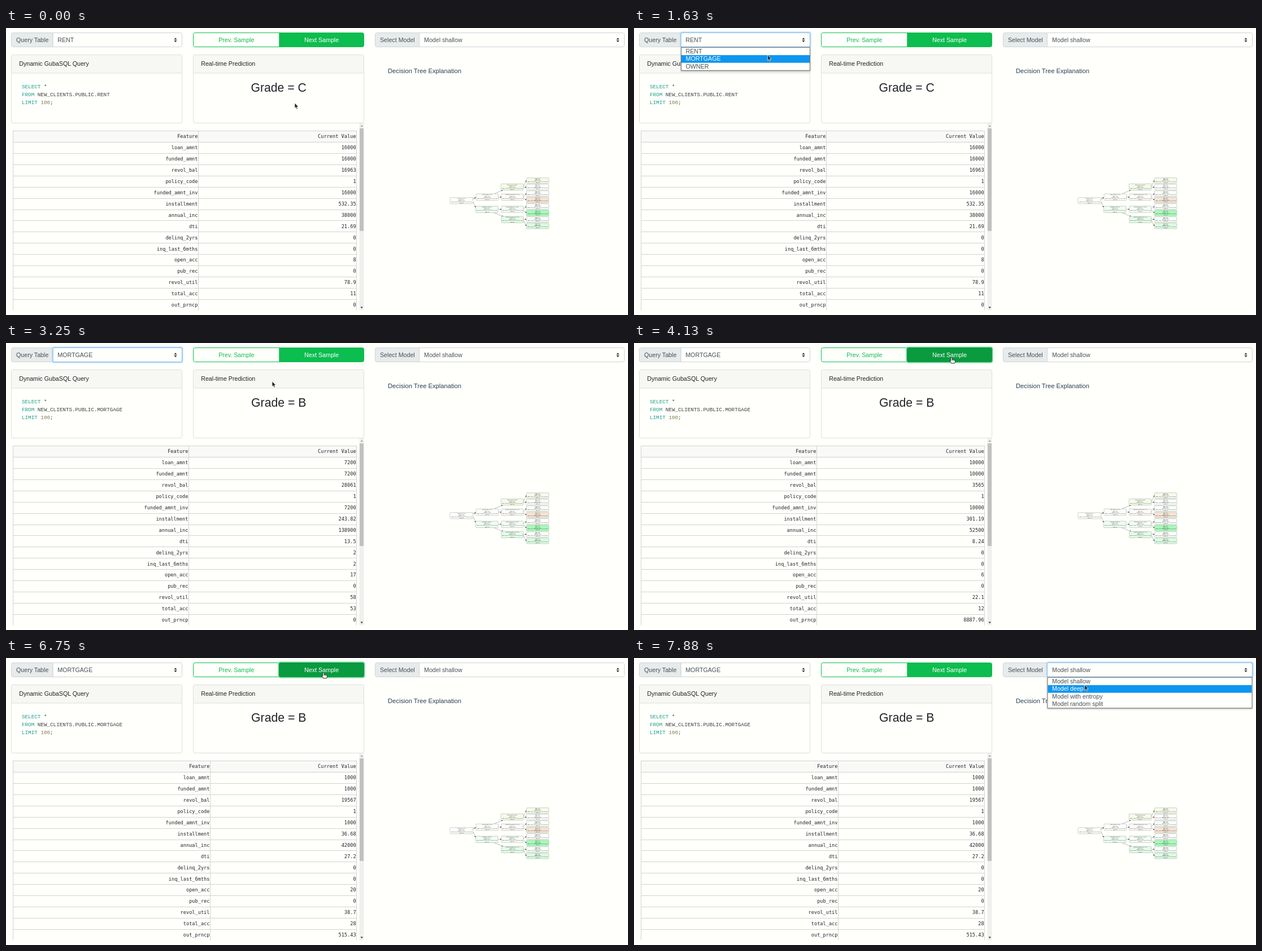
An HTML page that plays this animation: 1101x509 px, repeating every 8000 ms.

```html
<!DOCTYPE html>
<html lang="en">
<head>
<meta charset="utf-8">
<title>Loan grade dashboard</title>
<style>
html, body { margin: 0; width: 100%; height: 100%; overflow: hidden; background: #fffffc; }
svg { display: block; width: 1101px; height: 509px; font: 10.68px "Liberation Sans", Arial, sans-serif; }
text { white-space: pre; }
.code { font: 9.28px "Liberation Mono", monospace; }
.cell { font: 8.64px "DejaVu Sans Mono", monospace; text-anchor: end; }
.tiny { font-size: 1.75px; text-anchor: middle; }
.mid { text-anchor: middle; }
.menu { filter: drop-shadow(0 1px 1.5px rgba(0, 0, 0, .3)); }
</style>
</head>
<body>
<svg viewBox="0 0 1101 509"><g id="page"></g><g id="live"></g></svg>
<script>
const LOOP = 8000, STEP = 125;
const INK = '#212529', GREY = '#495057', GREEN = '#0cbd4f', DARK = '#0a9a40', PAPER = '#fffffc';
const $ = id => document.getElementById(id);

const rect = (x0, y0, x1, y1, fill, stroke = 'none', r = 0, more = '') =>
  `<rect x="${x0}" y="${y0}" width="${x1 - x0}" height="${y1 - y0}" rx="${r}" fill="${fill}" stroke="${stroke}" ${more}/>`;
const text = (x, y, s, fill = INK, more = '') => `<text x="${x}" y="${y}" fill="${fill}" ${more}>${s}</text>`;
const path = (d, fill, stroke = 'none', w = 1, more = '') =>
  `<path d="${d}" fill="${fill}" stroke="${stroke}" stroke-width="${w}" ${more}/>`;
const left = (x, y, r, b, k) => `M${r} ${y}H${x + k}Q${x} ${y} ${x} ${y + k}V${b - k}Q${x} ${b} ${x + k} ${b}H${r}Z`;
const right = (x, y, r, b, k) => `M${x} ${y}H${r - k}Q${r} ${y} ${r} ${y + k}V${b - k}Q${r} ${b} ${r - k} ${b}H${x}Z`;

// Table contents: one line per shown sample
const features = ('loan_amnt funded_amnt revol_bal policy_code funded_amnt_inv installment annual_inc dti ' +
  'delinq_2yrs inq_last_6mths open_acc pub_rec revol_util total_acc out_prncp').split(' ');
const samples = [
  [0, 340.5, '16000 16000 16963 1 16000 532.35 38000 21.69 0 0 8 0 78.9 11 0'],
  [2250, 323.5, '7200 7200 28061 1 7200 243.82 138900 13.5 2 2 17 0 58 53 0'],
  [4000, 323.5, '10000 10000 3565 1 10000 301.19 52500 8.24 0 0 6 0 22.1 12 8887.96'],
  [5250, 323.5, '8000 8000 27811 1 8000 263.58 93000 22.83 0 0 18 0 68.8 35 2975.36'],
  [6750, 361.5, '1000 1000 19567 1 1000 36.68 42000 27.2 0 0 20 0 38.7 28 515.43']
];

function select(x, split, end, label) {
  const arrow = end - 11.5;
  return path(left(x, 8.5, split, 33.5, 3), '#e7ebec', '#ced4d6') +
    path(right(split, 8.5, end, 33.5, 3), PAPER, '#ced4d6') +
    text(x + 8.5, 24.9, label, GREY) +
    path(`M${arrow - 2.6} 20.4h5.2l-2.6-3.2zM${arrow - 2.6} 22h5.2l-2.6 3.2z`, '#343a40');
}

function card(x, title) {
  return rect(x, 47.5, x + 302, 168.5, PAPER, '#dededb', 2.5) +
    path(`M${x + .5} 80V50q0-2 2-2h297q2 0 2 2v30z`, '#f7f7f4') +
    path(`M${x} 80h302`, 'none', '#dededb') +
    text(x + 13.7, 67, title);
}

function node(x, y, h, fill, title, w = 39.5) {
  const lines = [title, 'gini = 0.79', 'samples = 2194', 'value = [0.06, 0.19, 0.21, 0.2, 0.14, 0.12, 0.08]', 'class = B'];
  const pitch = (h - 1.2) / 5;
  return rect(x, y, x + w, y + h, fill, '#96a298', 1.2, 'stroke-width=".5"') +
    lines.map((s, i) => text(x + w / 2, y + .2 + pitch * (i + 1), s, '#000', 'class="tiny"')).join('');
}

function tree() {
  const edges = [
    [826.5, 304, 831.5, 300.5], [826.5, 308, 831.5, 318], [864, 294, 879, 287.7], [871.5, 300, 877, 300],
    [871.5, 321.5, 877, 321.5], [864, 327.7, 880, 334.2],
    ...[282, 300, 321.5, 340].flatMap((y, i) => [0, 1].map(k =>
      [916, y + k * 2 - 1, 921, 270.5 + (2 * i + k) * 11.5]))
  ];
  const heads = ([a, b, c, d]) => {
    const turn = Math.atan2(d - b, c - a) * 180 / Math.PI;
    return path(`M${a} ${b}L${c} ${d}`, 'none', '#777', .5) +
      path('M.5 0l-2.6-1v2z', '#222', 'none', 1, `transform="translate(${c} ${d}) rotate(${turn})"`);
  };
  const leaves = ['#f6faea', '#fdfefb', '#fbfdf8', '#f5e4d5', '#fcfefb', '#a5fbb8', '#f8fef8', '#ddfbe3'];
  return edges.map(heads).join('') +
    text(829, 301.5, 'True', '#000', 'class="tiny"') + text(831.5, 317, 'False', '#000', 'class="tiny"') +
    node(786, 300.7, 11, '#fdfefc', 'total_acc &lt;= 20.5', 40.5) +
    node(832, 294.2, 11.5, '#fbfdf9', 'revol_util_max &lt;= 37.5') +
    node(831.5, 316, 11.5, '#effcf1', 'installment &lt;= 283.41') +
    node(876.2, 276.3, 11.2, '#f4fbe9', 'total_rec_int &lt;= 488.91') +
    node(876.8, 294.2, 11.5, '#fdfbf8', 'collection_recovery_fee &lt;= 1.15', 38.8) +
    node(876.8, 315.8, 11.5, '#f4fdf5', 'funded_amnt_inv &lt;= 9412.5', 38.8) +
    node(876.8, 334, 11.5, '#e4fbe8', 'collection_recovery_fee &lt;= 2.5', 38.8) +
    leaves.map((c, i) => node(921.3, 265.7 + i * 11.48, 9.9, c, 'gini = 0.71')).join('');
}

$('page').innerHTML =
  select(9.5, 83, 311.5, 'Query Table') + select(653.5, 731.5, 1094.5, 'Select Model') +
  path(left(331.5, 8.5, 484, 33.5, 3), PAPER, GREEN) +
  text(407.8, 24.9, 'Prev. Sample', GREEN, 'class="mid"') +
  card(9.5, 'Dynamic GubaSQL Query') + card(331.5, 'Real-time Prediction') +
  text(676, 80.2, 'Decision Tree Explanation', '#2a3f50', 'style="font-size:11.2px"') +
  rect(625.5, 169, 633.5, 500.5, '#f0f0ee') + rect(626, 178, 633, 360, '#c1c1bf') +
  path('M627.4 175h4.6l-2.3-2.8z', '#a0a0a0') + path('M627.4 494.6h4.6l-2.3 2.8z', '#444') +
  tree();

function table([, split, values]) {
  const rowY = i => 182.5 + i * 19.93;
  const line = '#d2d2d0';
  const row = (a, b, i) => {
    const y = rowY(i) + 12.7 - (i ? 0 : .3);
    return text(split - 1, y, a, INK, 'class="cell"') + text(619.6, y, b, INK, 'class="cell"');
  };
  const nums = values.split(' ');
  let out = rect(13, 182.5, 621, 202.4, '#f9f9f7') + row('Feature', 'Current Value', 0);
  features.forEach((f, i) => out += row(f, nums[i], i + 1));
  for (let i = 0; i < 16; i++) out += path(`M12.5 ${Math.floor(rowY(i)) + .5}H621`, 'none', line);
  return out + path(`M12.5 182V500.5M${split} 182V500.5M620.5 182V500.5`, 'none', line);
}

function query(name) {
  const code = (y, s) => text(28, y, s, '#3c4043', 'class="code"');
  const key = s => `<tspan fill="#1f9f8a">${s}</tspan>`;
  return code(107, key('SELECT') + ' *') +
    code(121, key('FROM') + ' NEW_CLIENTS.PUBLIC.' + name) +
    code(135, key('LIMIT') + ' <tspan fill="#857a50">100</tspan>;');
}

function menu(x, end, items, y) {
  const pitch = 13.6;
  const hot = Math.max(0, Math.floor((y - 34) / pitch));
  return '<g class="menu">' + rect(x + .5, 34.3, end - .5, 34.5 + items.length * pitch, PAPER, '#6c7072') + '</g>' +
    rect(x + 1, 34.5 + hot * pitch, end - 1, 34.5 + (hot + 1) * pitch, '#0d96f0') +
    items.map((s, i) => text(x + 8.5, 44.6 + i * pitch, s, i === hot ? '#fff' : GREY)).join('');
}

const ring = (x, end, glow, edge) =>
  rect(x - 1, 7.5, end + 1, 34.5, 'none', glow, 3, 'stroke-width="2.4"') + rect(x, 8.5, end, 33.5, 'none', edge, 2);

// Pointer route: time, x, y
const route = [
  [125, 511, 133], [875, 241, 19], [1250, 241, 19], [1625, 236.5, 48], [2000, 236.5, 51],
  [2750, 395, 82], [2875, 395, 82], [3250, 471, 68], [3625, 562, 25.5],
  [6750, 562, 25.5], [7500, 798, 25], [7750, 798, 25], [7875, 797.5, 47.8]
];
function pointerAt(t) {
  const i = route.findIndex(p => p[0] > t);
  if (i < 0) return route[route.length - 1].slice(1);
  if (!i) return route[0].slice(1);
  const [a, b] = [route[i - 1], route[i]];
  const k = (t - a[0]) / (b[0] - a[0]);
  return [1, 2].map(n => a[n] + (b[n] - a[n]) * k);
}
function pointer(x, y) {
  const hand = x > 331 && x < 634 && y < 34;
  const shape = hand
    ? path('M-1.3.7Q0-.8 1.2.7V4Q2.5 3.2 3.2 4.5 4.6 3.8 5.2 5.2 6.4 5 6.4 6.3V8.2Q6.2 9.4 5.3 10.4H-.3Q-.9 9-3 6.6-3.2 5-1.3 6Z', '#fff', '#111', .9) +
      path('M1.2 4V6M3.2 4.5V6.2', 'none', '#111', .6)
    : path('M0 0V9.4L2.1 7.5 3.7 11 5.4 10.2 3.8 6.9 6.7 6.7Z', '#222', '#fff', .7);
  return `<g transform="translate(${x} ${y})">${shape}</g>`;
}

function scene(t) {
  const [x, y] = pointerAt(t);
  const between = (a, b) => t >= a && t < b;
  const hover = between(3500, 7625);
  const owner = t < 2250 ? 'RENT' : 'MORTGAGE';
  let out = table(samples.filter(s => s[0] <= t).pop()) + query(owner) +
    text(482.7, 113.3, 'Grade = ' + (t < 2250 ? 'C' : 'B'), INK, 'class="mid" style="font-size:21.2px"') +
    path(right(484, 8.5, 633.5, 33.5, 3), hover ? DARK : GREEN, hover ? DARK : GREEN);
  if (between(3750, 7625)) out += ring(483.5, 633.5, '#8ae0aa', DARK);
  out += text(558.6, 24.9, 'Next Sample', '#fff', 'class="mid"');
  if (between(1125, 3875)) out += `<g opacity="${t < 3750 ? 1 : .5}">${ring(83, 311.5, '#bfdff7', '#85bdec')}</g>`;
  if (t >= 7625) out += ring(731.5, 1094.5, '#bfdff7', '#85bdec');
  out += text(91.2, 24.9, t < 2000 ? 'RENT' : 'MORTGAGE', GREY) + text(740, 24.9, 'Model shallow', GREY);
  if (between(1250, 2000)) out += menu(83, 312, ['RENT', 'MORTGAGE', 'OWNER'], y);
  if (t >= 7625) out += menu(731.5, 1094.5, ['Model shallow', 'Model deep', 'Model with entropy', 'Model random split'], y);
  return out + pointer(x, y);
}

const start = performance.now();
let shown = -1;
function tick() {
  const t = Math.floor((performance.now() - start) % LOOP / STEP) * STEP;
  if (t !== shown) $('live').innerHTML = scene(shown = t);
  requestAnimationFrame(tick);
}
tick();
</script>
</body>
</html>
```
